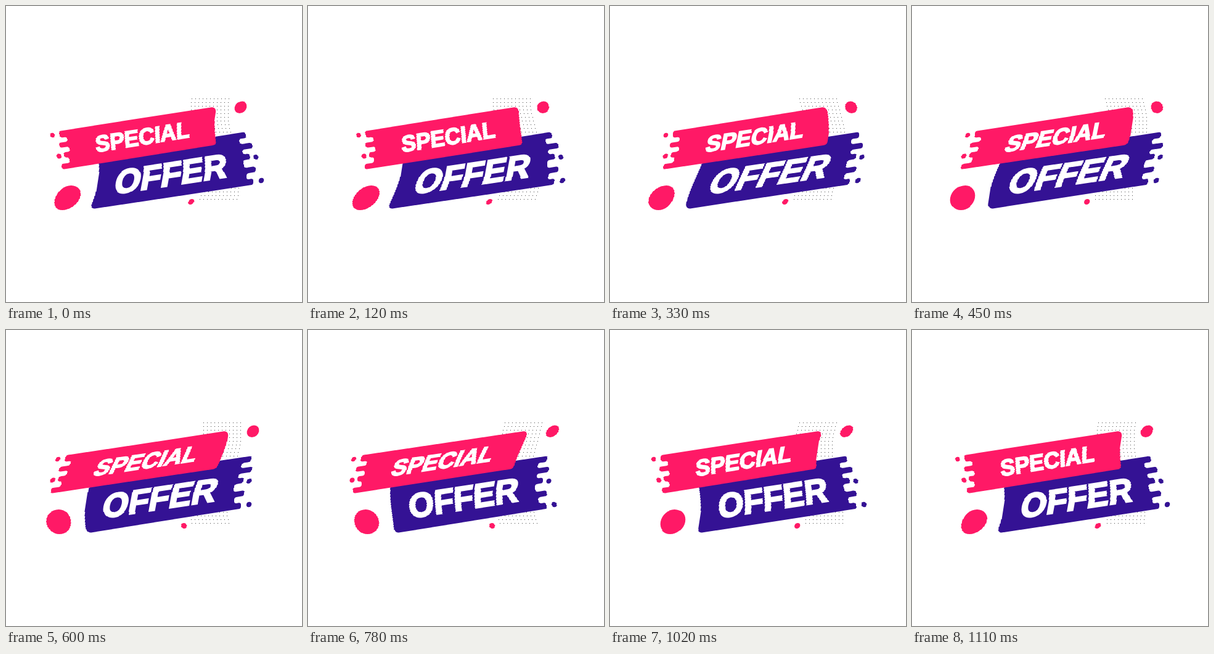
These frames come from a looping animation (480 px wide and 480 px high, 1.14 s). An HTML page with a canvas:

```html
<!DOCTYPE html>
<html lang="en">
<head>
<meta charset="utf-8">
<title>Special offer</title>
<style>
  html, body { margin: 0; width: 100%; height: 100%; overflow: hidden; background: #fff; }
  canvas { display: block; width: 480px; height: 480px; }
</style>
</head>
<body>
<canvas id="stage" width="480" height="480" role="img" aria-label="Special offer"></canvas>
<script>
const SIZE = 480, LOOP = 1140, STEP = 30;
const PINK = '#ff1966', NAVY = '#341294';
const TILT = -0.154, LEAN = -0.18;

const stage = document.getElementById('stage').getContext('2d');
const art = document.createElement('canvas');
art.width = art.height = SIZE;
const g = art.getContext('2d');

function dot(x, y, r, color) {
  g.save();
  g.transform(1, 0, LEAN, 1, x, y);
  g.fillStyle = color;
  g.beginPath();
  g.arc(0, 0, r, 0, 2 * Math.PI);
  g.fill();
  g.restore();
}

function grid(left, top, cols, rows) {
  g.fillStyle = '#444';
  for (let r = 0; r < rows; r++) {
    for (let c = 0; c < cols; c++) {
      g.fillRect(left + c * 6, top + r * 6, 1, 1);
    }
  }
}

// Rounded polygon on the tilted axis; each point is [x, y, radius].
function band(points, color) {
  const n = points.length;
  const [ax, ay] = points[0], [bx, by] = points[n - 1];
  g.save();
  g.transform(1, TILT, 0, 1, 0, 0);
  g.beginPath();
  g.moveTo((ax + bx) / 2, (ay + by) / 2);
  points.forEach(([x, y, r], i) => {
    const [nx, ny] = points[(i + 1) % n];
    g.arcTo(x, y, nx, ny, r);
  });
  g.closePath();
  g.fillStyle = color;
  g.fill();
  g.restore();
}

// Alternating fingers and gaps down a ragged edge: xs[i] spans ys[i]..ys[i + 1].
function ragged(xs, ys) {
  return xs.flatMap((x, i) => [[x, ys[i], 3.8], [x, ys[i + 1], 3.8]]);
}

function label(text, x, y, size, weight, lean) {
  g.save();
  g.transform(0.988, -0.152, lean, 1, x, y);
  g.font = `bold ${size}px "Liberation Sans", Arial, sans-serif`;
  g.fillStyle = g.strokeStyle = '#fff';
  g.lineWidth = weight;
  g.fillText(text, 0, 0);
  g.strokeText(text, 0, 0);
  g.restore();
}

function paintArt() {
  grid(310, 150, 11, 10);
  grid(307, 295, 11, 4);

  band([
    [145.5, 264.9, 6],
    ...ragged(
      [394, 381, 400, 381, 391, 378, 396, 380, 391],
      [264.9, 274.5, 283, 292, 299.5, 308.5, 321, 330, 340, 350]),
    [132, 350, 7]
  ], NAVY);
  dot(400.5, 245, 4, NAVY);
  dot(404, 283, 4.2, NAVY);

  band([
    [351.5, 217.2, 7],
    [342, 277.6, 6],
    ...ragged(
      [82, 97, 90, 102, 87, 103, 92],
      [277.6, 269, 260, 251.5, 243.5, 235.5, 228, 217.2])
  ], PINK);
  dot(80.5, 209.5, 3.7, PINK);
  dot(81.6, 243.5, 4, PINK);
  dot(92, 311, 20, PINK);
  dot(293.7, 317.5, 4.6, PINK);
  dot(390.5, 164.3, 9.8, PINK);

  label('SPECIAL', 143.6, 237.2, 37, 2, -0.2);
  label('OFFER', 163.8, 305.6, 54.8, 2.8, -0.18);
}

// A travelling sine wave slides every row sideways.
function shift(y, t) {
  return 10.5 * Math.cos(2 * Math.PI * (t / LOOP + (y - 311) / 227 - 0.883));
}

function frame(now) {
  const t = Math.floor((now % LOOP) / STEP) * STEP;
  stage.fillStyle = '#fff';
  stage.fillRect(0, 0, SIZE, SIZE);
  for (let y = 140; y < 340; y++) {
    stage.drawImage(art, 0, y, SIZE, 1, Math.round(shift(y, t)), y, SIZE, 1);
  }
}

paintArt();
const start = performance.now();
function tick() {
  frame(performance.now() - start);
  requestAnimationFrame(tick);
}
tick();
</script>
</body>
</html>
```
